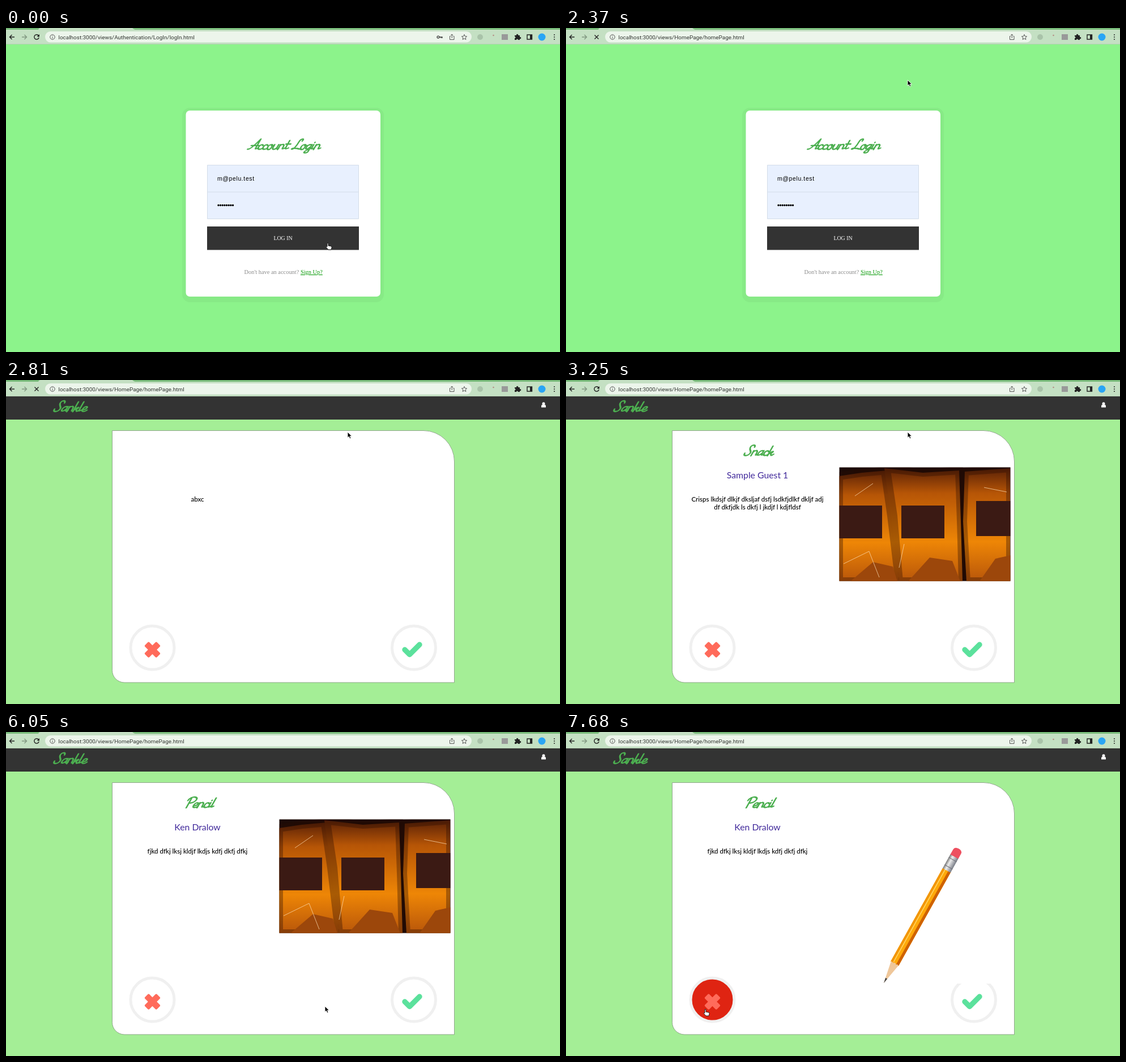
An HTML page that plays this animation: 978x573 px, repeating every 8000 ms.

```html
<!DOCTYPE html>
<html lang="en">
<head>
<meta charset="utf-8">
<title>Login and swipe demo</title>
<style>
  html, body { margin: 0; width: 100%; height: 100%; overflow: hidden; }
  svg { display: block; }
  .ui { font-family: Roboto, sans-serif; }
  .serif { font-family: "Liberation Serif", serif; }
  .arial { font-family: "Liberation Sans", sans-serif; }
  .lato { font: 500 11.5px Lato, sans-serif; font-variant-ligatures: none; text-anchor: middle; }
  .name { font-size: 15.8px; font-weight: 400; fill: #41299b; }
  .line { fill: none; stroke: #222; stroke-width: 1.4; }
  .script { fill: none; stroke: #4caf50; stroke-width: 2.7; stroke-linecap: round; stroke-linejoin: round; }
  .ring { fill: #fff; stroke: #f0f0f0; stroke-width: 5; }
</style>
</head>
<body>
<svg width="978" height="573" viewBox="0 0 978 573">
  <defs>
    <linearGradient id="bag" x2="0" y2="1">
      <stop offset="0" stop-color="#5a2106"/>
      <stop offset=".22" stop-color="#b65506"/>
      <stop offset=".65" stop-color="#ee8606"/>
      <stop offset="1" stop-color="#b8560a"/>
    </linearGradient>
    <linearGradient id="metal">
      <stop offset="0" stop-color="#777"/>
      <stop offset=".35" stop-color="#eee"/>
      <stop offset="1" stop-color="#777b85"/>
    </linearGradient>
    <clipPath id="frame"><path d="M482.5 154.5H784.5V355.5H482.5Z"/></clipPath>
  </defs>

  <g id="login">
    <rect width="978" height="573" fill="#8cf38b"/>
    <rect x="311" y="141" width="356" height="344" rx="14" fill="#87ea86"/>
    <rect x="317.5" y="146" width="343.5" height="329" rx="7" fill="#fff"/>
    <g class="script" data-text="Account Login" data-size="1.03" transform="translate(427 215)"/>
    <path d="M355.5 242.5H622.5V337.5H355.5ZM355.5 290H622.5" fill="#e8f0fe" stroke="#d3dce8"/>
    <text class="arial" x="373" y="270" font-size="10.5" letter-spacing=".6">m@pelu.test</text>
    <path d="M375 313.5h27" stroke="#000" stroke-width="3.4" stroke-linecap="round" stroke-dasharray="0 3.65"/>
    <rect x="355" y="351" width="268" height="41.5" fill="#333"/>
    <text class="serif" x="489" y="375" font-size="9.9" fill="#fff" text-anchor="middle">LOG IN</text>
    <text class="serif" x="420.5" y="435" font-size="10.4" fill="#8c8c8c">Don't have an account? <tspan fill="#089a08" text-decoration="underline">Sign Up?</tspan></text>
  </g>

  <g id="home">
    <rect width="978" height="573" fill="#a4ee96"/>
    <rect y="28" width="978" height="42" fill="#333"/>
    <g class="script" data-text="Sankle" data-size="1.06" transform="translate(83 56)"/>
    <g fill="#fff"><circle cx="949" cy="41.7" r="2.5"/><path d="M945 48.5V46q0-2.500 2-2.500h4q2 0 2 2.500v2.500Z"/></g>
    <path d="M187.500 89.500H737a54.500 54.500 0 0 1 54.500 54.500V535H209a21.500 21.500 0 0 1-21.500-21.500Z" fill="#fff" stroke="#82947e" stroke-width=".8"/>
    <circle class="ring" id="no" cx="258.5" cy="473.5" r="38.5"/>
    <circle class="ring" id="yes" cx="720" cy="473.5" r="38.5"/>
    <g fill="#ff6b5b" transform="translate(258.5 477) rotate(45)">
      <rect x="-15" y="-5.5" width="30" height="11" rx="2.2"/>
      <rect x="-5.5" y="-15" width="11" height="30" rx="2.2"/>
    </g>

    <g id="chips" clip-path="url(#frame)">
      <rect x="482" y="154" width="303" height="202" fill="#1c0a06"/>
      <g fill="url(#bag)">
        <path id="leftBag" d="M482 170L522 164 566 160 578 240 588 356H482Z"/>
        <path id="midBag" d="M562 156L630 164 694 160 697 250 700 356H588L574 240Z"/>
        <path id="rightBag" d="M704 162L784 156V356H707L701 250Z"/>
      </g>
      <g fill="none" stroke="#2a0d04" stroke-width="14" opacity=".35">
        <use href="#leftBag"/><use href="#midBag"/><use href="#rightBag"/>
      </g>
      <path d="M482 222h76v58h-76ZM592 222h76v58h-76ZM724 214h62v62h-62Z" fill="#3b1a14"/>
      <path d="M502 356l40-34 35 8 8 26ZM604 356l38-42 40 6 14 36ZM730 356l28-40 27-6v46Z" fill="#9c470b"/>
      <path d="M490 325l45-22 18 46M510 205l32-22M597 290l-9 42M738 190l40 8" fill="none" stroke="#ffe3bd" opacity=".7"/>
    </g>

    <g id="pencil">
      <rect x="483" y="154" width="301" height="291" fill="#fff"/>
      <g transform="translate(561 444) rotate(29.1)">
        <path d="M0 0L-8-42H8Z" fill="#efc79a"/>
        <path d="M0 0L-1.8-9.5H1.8Z" fill="#444"/>
        <path d="M-8-229H8V-39q-3-4-5.500 0-2.500-4-5 0-3-4-5.500 0Z" fill="#ffa90a"/>
        <path d="M-8-229h4v190q-2-3-4 0Z" fill="#f2960a"/>
        <path d="M3-229h5v190q-2.500-3-5 0Z" fill="#cf6200"/>
        <path d="M-3-229v188" stroke="#ffd766" stroke-width="1.5"/>
        <rect x="-8" y="-257" width="16" height="29" fill="url(#metal)"/>
        <path d="M-8-250H8M-8-235H8" stroke="#70737b"/>
        <path d="M-8-256v-10q0-6 8-6t8 6v10Z" fill="#ee5060"/>
      </g>
    </g>
    <path d="M704 477l8.500 8.500L730 468" fill="none" stroke="#5be19c" stroke-width="9.4" stroke-linecap="round" stroke-linejoin="round"/>

    <text id="stub" class="lato" x="338" y="215">abxc</text>
    <g id="snack">
      <g class="script" data-text="Snack" data-size="1.04" transform="translate(313 134)"/>
      <text class="lato name" x="338" y="173.5">Sample Guest 1</text>
      <text class="lato" x="338" y="215">Crisps lkdsjf dlkjf dksljaf dsfj lsdkfjdlkf dkljf adj</text>
      <text class="lato" x="338" y="228.5">df dkfjdk ls dkfj l jkdjf l kdjfldsf</text>
    </g>
    <g id="tool">
      <g class="script" data-text="Pencil" data-size="1.06" transform="translate(314 134)"/>
      <text class="lato name" x="338" y="173.5">Ken Dralow</text>
      <text class="lato" x="338" y="215">fjkd dfkj lksj kldjf lkdjs kdfj dkfj dfkj</text>
    </g>
  </g>

  <g id="browser" class="ui">
    <rect width="978" height="28.5" fill="#c4e0c3"/>
    <path d="M0 0H61q-3 0-4 3H0ZM223 0H978V3H228q-2 0-5-3Z" fill="#78bb7a"/>
    <path d="M0 28.5H978" stroke="#b5cfb4"/>
    <rect x="69" y="6" width="753" height="19.5" rx="9.7" fill="#ecf5eb"/>
    <path class="line" d="M15 16H6.500m4-4l-4 4 4 4"/>
    <path class="line" d="M28 16h8.500m-4-4l4 4-4 4" style="stroke:#819781"/>
    <g id="reload"><path class="line" d="M57.500 13.500a4.200 4.200 0 1 0 .6 3.500"/><path d="M59 11v4.500h-4.500Z" fill="#222"/></g>
    <path id="stop" class="line" d="M50.500 12.500l7 7m0-7l-7 7"/>
    <g class="line" style="stroke:#555;stroke-width:1">
      <circle cx="82" cy="16" r="4.2"/><path d="M82 15.500v3M82 13.300v1"/>
      <path d="M785 14.500h-1.500v6h7.500v-6h-1.500M787.200 18v-7m-2 2l2-2 2 2"/>
      <path d="M809 11.500l1.300 3.100 3.300.3-2.500 2.200.8 3.300-2.900-1.800-2.900 1.800.8-3.300-2.500-2.200 3.300-.3Z"/>
    </g>
    <g id="key" class="line" style="stroke:#444"><circle cx="763" cy="16" r="1.9"/><path d="M765 16h5v2m-2-2v2"/></g>
    <text id="url" x="92.5" y="19.5" font-size="9.95" fill="#303530"></text>
    <circle cx="837" cy="16" r="5" fill="#a9c3a9"/>
    <circle cx="860.5" cy="13" r="1.3" fill="#b78f87"/>
    <rect x="875" y="11" width="11" height="10" fill="#999"/>
    <path d="M898 13h3a1.700 1.700 0 1 1 3.200 0H907v3a1.700 1.700 0 1 1 0 3.200V21h-3a1.500 1.500 0 0 0-3 0h-3v-3a1.500 1.500 0 0 0 0-3Z" fill="#222"/>
    <path class="line" d="M920 12h8.500v8H920Z"/><path d="M925 12h4v8h-4Z" fill="#222"/>
    <circle cx="946" cy="16" r="6.5" fill="#2aa5f5"/>
    <path d="M968 12v9" stroke="#222" stroke-width="2" stroke-linecap="round" stroke-dasharray="0 4"/>
  </g>

  <g id="dialog" class="ui" style="filter:drop-shadow(0 2px 3px #0006)">
    <rect x="335" y="26" width="308" height="89.5" rx="4" fill="#292a2d"/>
    <text x="347" y="48" font-size="11" fill="#e8eaed">localhost:3000 says</text>
    <text x="347" y="68" font-size="9.4" fill="#e8eaed">Welcome back!</text>
    <rect x="588" y="82" width="44" height="22" rx="2.5" fill="#8ab4f8"/>
    <text x="610" y="96.2" font-size="8.8" font-weight="500" fill="#202124" text-anchor="middle">OK</text>
  </g>

  <path id="arrow" d="M0 0V10.200L2.300 8 4 11.700 5.900 10.900 4.300 7.300H7.500Z" stroke="#fff" stroke-width=".9"/>
  <path id="hand" d="M-1 1q1-2 2 0V5l5 1q1.500.500 1 2.500L6 12H1L-3 7.500q0-1.500 2-.5Z" fill="#fff" stroke="#111" stroke-width=".9"/>
</svg>
<script>
const $ = id => document.getElementById(id);

// Brush lettering: [advance, path], drawn upright on the baseline, then flattened and slanted.
const tail = 'V-3q0 3 3.5 0';
const bowl = 'M8-9C3-12 1-7 1-4S4 1 8-6M8-10';
const curl = 'C6-11 1-10 1-5S5 1 9-3';
const glyphs = {
  ' ': [7, ''],
  A: [15, 'M-1-1Q4 1 12-21' + tail + 'M2-8H15'],
  L: [13, 'M10-17C12-23 5-22 5-15S3 0 0-1 4-4 13-1'],
  P: [13, 'M4-18V0M0-14C1-24 16-22 13-14Q11-9 4-9'],
  S: [12, 'M11-17C11-23 3-22 4-16S11-9 9-4 0 1 0-5'],
  a: [10, bowl + tail],
  c: [8, 'M7-8' + curl],
  e: [8, 'M1-4Q7-4 7-8' + curl],
  g: [10, bowl + 'V3C8 8 0 7 2 4Q3 2 11-3'],
  i: [4.5, 'M1-10' + tail + 'M1-14v-.5'],
  k: [9, 'M1-19V0M1-4C7-13 10-5 2-5Q5-5 6-2T10-3'],
  l: [5, 'M1-19' + tail],
  n: [10, 'M1-10V0V-4C1-12 8-12 8-6' + tail],
  o: [9, 'M5-10C-1-10 0 0 4 0S9-10 5-10Q6-6 10-8'],
  t: [8, 'M3-18V-4Q3 0 8-3M0-11H8'],
  u: [10, 'M1-10V-4C1 1 8 1 8-6V-10' + tail]
};
for (const g of document.querySelectorAll('.script')) {
  const { text, size } = g.dataset;
  let x = 0;
  const paths = [...text].map(ch => {
    const [advance, d] = glyphs[ch];
    const path = `<path transform="translate(${x})" d="${d}"/>`;
    x += advance;
    return path;
  });
  g.innerHTML = `<title>${text}</title><g transform="scale(${size} ${size * .86}) skewX(-26)">${paths.join('')}</g>`;
}

const LOOP = 8000, TICK = 147.5;

// Pointer stops: tick, x, y
const stops = [
  [0, 568, 380], [2, 568, 381], [8, 568, 381], [10, 603, 92], [22, 603, 92],
  [28, 353, 455], [30, 526, 470], [32, 712, 484], [34, 722, 482], [39, 722, 482],
  [41, 563, 485], [46, 563, 485], [51, 250, 492], [52, 246, 490], [55, 246, 490]
];

function pointer(tick) {
  const i = stops.findIndex(s => s[0] > tick);
  const [t0, x0, y0] = stops[i - 1], [t1, x1, y1] = stops[i];
  const p = (tick - t0) / (t1 - t0);
  return [x0 + (x1 - x0) * p, y0 + (y1 - y0) * p];
}

const show = (id, on) => $(id).style.display = on ? '' : 'none';

function draw() {
  const tick = Math.floor(performance.now() % LOOP / TICK);
  const within = (from, to) => tick >= from && tick < to;
  const [x, y] = pointer(tick);
  const atHome = tick >= 19, left = tick >= 14;

  show('login', !atHome);
  show('home', atHome);
  show('dialog', within(7, 13));
  show('stub', tick < 21);
  show('snack', within(21, 39));
  show('tool', tick >= 39);
  show('chips', within(22, 42));
  show('pencil', tick >= 42);
  show('key', !left);
  show('stop', within(14, 22));
  show('reload', !within(14, 22));
  $('url').textContent = 'localhost:3000/views/' + (left ? 'HomePage/homePage.html' : 'Authentication/LogIn/logIn.html');

  const over = cx => atHome && Math.hypot(x - cx, y - 473.5) < 41;
  const onNo = over(258.5), onYes = over(720);
  $('no').style.fill = onNo ? '#df2412' : '';
  $('yes').style.fill = onYes ? '#21a950' : '';

  const hand = tick < 7 || onNo || onYes;
  show('hand', hand);
  show('arrow', !hand);
  $(hand ? 'hand' : 'arrow').setAttribute('transform', `translate(${x} ${y})`);
  requestAnimationFrame(draw);
}
draw();
</script>
</body>
</html>
```
